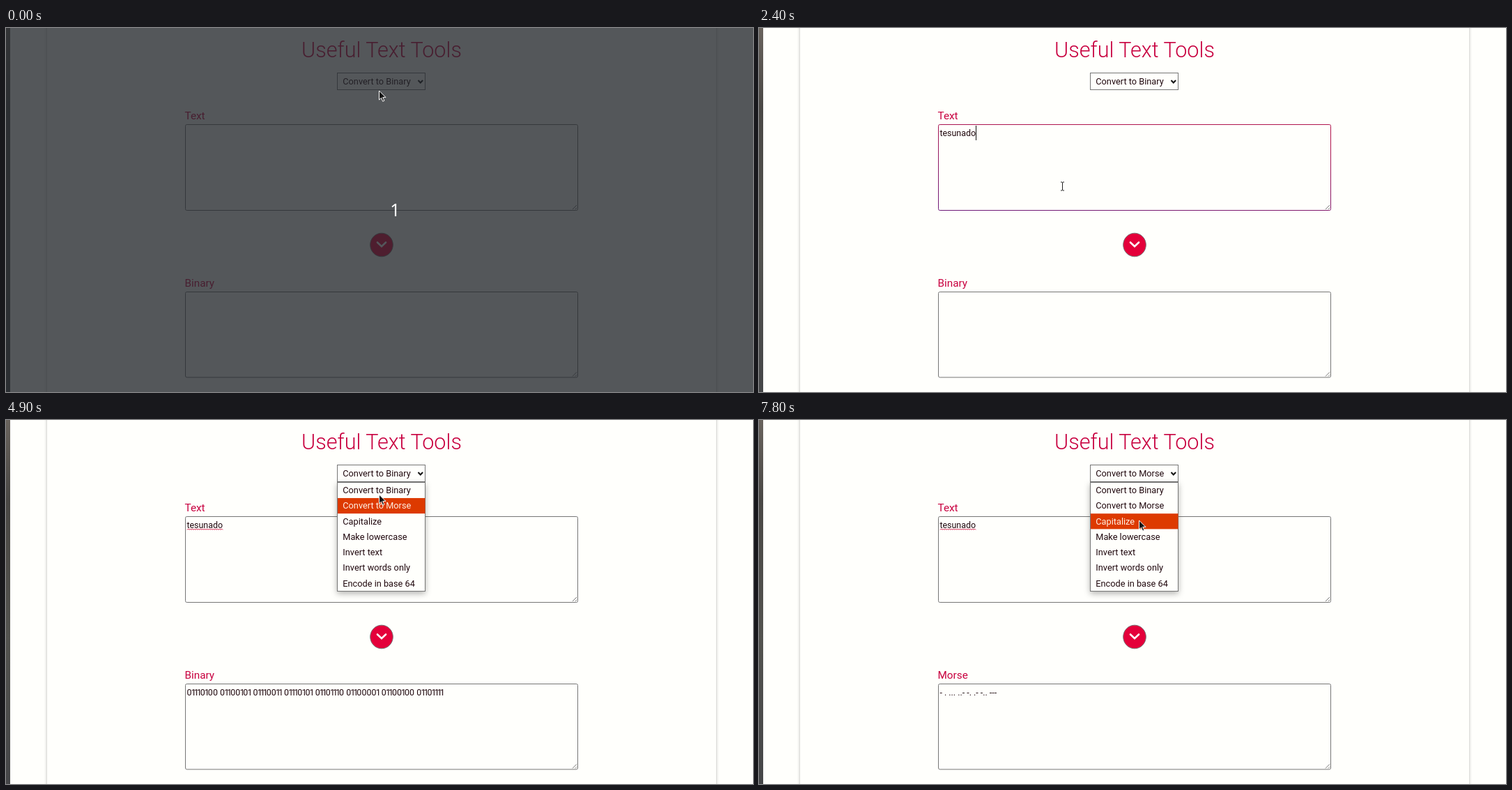
Animation, 1072 px wide and 522 px high, one loop 8 s. Source, as an HTML page:

```html
<!DOCTYPE html>
<html lang="en">
<head>
<meta charset="utf-8">
<title>Useful Text Tools</title>
<style>
  html, body { margin: 0; width: 100%; height: 100%; overflow: hidden; background: #fffffc; }
  svg { display: block; font: 12.75px Roboto, sans-serif; fill: #21090f; }
  .card { fill: #fffffc; filter: drop-shadow(0 0 2px rgba(0, 0, 0, .3)); }
  .heading { font-size: 30.6px; font-weight: 300; text-anchor: middle; }
  .label { font-size: 15.3px; }
  .heading, .label { fill: #c8003f; }
  .content { font-size: 12.4px; }
  .box { fill: #fffffc; stroke: #767676; }
  .line { fill: none; }
  .menu { filter: drop-shadow(0 3px 4px rgba(0, 0, 0, .3)); }
</style>
</head>
<body>
<svg width="1072" height="522" viewBox="0 0 1072 522">
  <defs>
    <linearGradient id="photo" x2="0" y2="1">
      <stop stop-color="#69635d"/>
      <stop offset=".22" stop-color="#4a4845"/>
      <stop offset=".6" stop-color="#53534f"/>
      <stop offset="1" stop-color="#454648"/>
    </linearGradient>
    <linearGradient id="focus" x1="0" y1="1" x2=".35" y2="0">
      <stop stop-color="#6d1a78"/>
      <stop offset="1" stop-color="#b0134c"/>
    </linearGradient>
  </defs>

  <rect width="1072" height="522" fill="#fffffc"/>
  <rect width="6" height="522" fill="url(#photo)"/>
  <rect class="card" x="59" y="-10" width="960" height="545"/>
  <text class="heading" x="539" y="42">Useful Text Tools</text>

  <rect class="box" x="475.5" y="64.5" width="126" height="24"/>
  <text id="choice" x="483.3" y="81"></text>
  <path class="line" d="M591.5 75l3.3 3.5 3.3-3.5" stroke="#111" stroke-width="2"/>

  <text class="label" x="256.5" y="131">Text</text>
  <rect class="box" id="input" x="257.5" y="138.5" width="563" height="123" rx="2"/>
  <text class="content" id="typed" x="259.5" y="155"></text>
  <path class="line" id="squiggle" stroke="#d3123f"/>
  <path class="line" id="caret" stroke="#111"/>

  <ellipse id="button" cx="539" cy="311" rx="16.3" ry="16.8" stroke="#767676"/>
  <path class="line" d="M533 307.5l6 5.6 6-5.6" stroke="#fff" stroke-width="2.6" stroke-linecap="round"/>

  <text class="label" id="mode" x="256.5" y="371"></text>
  <rect class="box" x="257.5" y="378.5" width="563" height="122.5" rx="2"/>
  <text class="content" id="output" y="394.5"></text>
  <path class="line" d="M813 260l6-6M817 260l2-2M813 499.5l6-6M817 499.5l2-2" stroke="#777"/>

  <g id="menu">
    <rect class="box menu" x="475.5" y="89.5" width="126" height="156"/>
    <rect id="highlight" x="476" width="125.5" height="22.2" fill="#dd3a00"/>
    <g id="items"></g>
  </g>

  <g id="countdown">
    <rect width="1072" height="522" fill="#23272d" opacity=".775"/>
    <text x="558.5" y="270" fill="#fff" style="font:25px 'Noto Sans',sans-serif;text-anchor:middle">1</text>
  </g>
  <path id="pointer"/>
</svg>
<script>
const $ = id => document.getElementById(id);
const set = (id, attrs) => { for (const k in attrs) $(id).setAttribute(k, attrs[k]); };
const show = (id, on) => set(id, { visibility: on ? 'visible' : 'hidden' });

const LOOP = 8000, STEP = 100, ROW = 22.25, MENU_TOP = 89.7;
const word = 'tesunado';
const keyTimes = [1100, 1300, 1400, 1800, 1900, 2100, 2300, 2400];
const options = ['Convert to Binary', 'Convert to Morse', 'Capitalize', 'Make lowercase',
  'Invert text', 'Invert words only', 'Encode in base 64'];
const morseCode = { t: '-', e: '.', s: '...', u: '..-', n: '-.', a: '.-', d: '-..', o: '---' };
const encode = fn => [...word].map(fn).join(' ');
const binary = encode(c => c.charCodeAt(0).toString(2).padStart(8, '0'));
const morse = encode(c => morseCode[c]);

// Proportional digits: a "1" takes less room than a "0".
let pen = 259.5;
const binaryX = [...binary].map(c => {
  const x = c === '1' ? pen - 0.9 : pen;
  pen += { 0: 7.06, 1: 4.05, ' ': 3.1 }[c];
  return x.toFixed(2);
}).join(' ');

// Pointer path: time, x, y
const path = [
  [0, 535.5, 90], [200, 535.5, 90], [700, 435.5, 227], [3100, 435.5, 227],
  [3400, 614, 285], [3700, 541, 307], [4100, 541, 307], [4600, 536, 75],
  [4700, 536, 75], [4900, 535.5, 107], [5000, 537, 122], [5300, 537, 122],
  [5900, 540, 300], [6100, 540, 300], [6200, 541, 236], [6300, 541, 236],
  [7100, 538, 77], [7400, 538, 77], [7800, 545.5, 144], [8000, 545.5, 144]
];
const shapes = {
  arrow: ['M0 0v13l3-2.8 2.2 5 2.2-1-2.2-4.8h4.2z', '#111', '#fff'],
  beam: ['M-2.5-6h2l.5.5.5-.5h2M0-5.5v11M-2.5 6h2l.5-.5.5.5h2', 'none', '#222'],
  hand: ['M-1.5 1a1.5 1.5 0 0 1 3 0v4.5l5.5 1q1.5.4 1.4 2l-.6 5q-.2 1.5-1.2 1.5h-5.6l-4.2-5q-1-1.4.2-2t1.5 1z', '#fff', '#222']
};

function pointerAt(t) {
  const i = path.findIndex(p => p[0] > t);
  const [t0, x0, y0] = path[i - 1], [t1, x1, y1] = path[i];
  const u = (t - t0) / (t1 - t0), e = u * u * (3 - 2 * u);
  return [x0 + (x1 - x0) * e, y0 + (y1 - y0) * e];
}

const items = options.map((label, i) => {
  const item = document.createElementNS('http://www.w3.org/2000/svg', 'text');
  item.textContent = label;
  item.setAttribute('x', 483.3);
  item.setAttribute('y', 105 + ROW * i);
  return $('items').appendChild(item);
});

function draw(t) {
  const [x, y] = pointerAt(t);
  const within = (a, b) => t >= a && t < b;
  const selected = t < 5100 ? 0 : 1;
  const open = within(4700, 5100) || t >= 7100;
  const overInput = !open && x > 257 && x < 821 && y > 138 && y < 262;
  const overButton = Math.hypot(x - 539, y - 311) < 17;

  show('countdown', t < 200);
  $('choice').textContent = options[selected];
  $('mode').textContent = ['Binary', 'Morse'][selected];

  $('typed').textContent = word.slice(0, keyTimes.filter(k => k <= t).length);
  const end = 259.5 + $('typed').getComputedTextLength();
  set('caret', { d: `M${Math.round(end) + 0.5} 140v21` });
  show('caret', within(700, 3000) || within(3500, 3900));
  set('squiggle', { d: 'M260 157.5' + 'l1.5-1.5 1.5 1.5'.repeat(Math.max(0, Math.round((end - 260) / 3))) });
  show('squiggle', t >= 3200);
  set('input', { stroke: overInput || within(700, 3900) ? 'url(#focus)' : '#767676' });
  $('input').style.stroke = overInput || within(700, 3900) ? 'url(#focus)' : '';

  set('button', { fill: overButton && !within(4000, 5400) ? '#df0000' : '#e4003a' });
  $('output').textContent = t < 4000 ? '' : t < 6200 ? binary : morse;
  set('output', { x: t < 6200 ? binaryX : 259.5 });

  show('menu', open);
  const active = y > 89 ? Math.floor((y + 8 - MENU_TOP) / ROW) : selected;
  set('highlight', { y: MENU_TOP + ROW * active });
  items.forEach((item, i) => item.setAttribute('fill', i === active ? '#fff0e6' : '#21090f'));

  const [d, fill, stroke] = shapes[overInput ? 'beam' : overButton ? 'hand' : 'arrow'];
  set('pointer', { d, fill, stroke, transform: `translate(${x} ${y})` });
}

function tick() {
  draw(Math.floor(performance.now() % LOOP / STEP) * STEP);
  requestAnimationFrame(tick);
}
tick();
</script>
</body>
</html>
```
